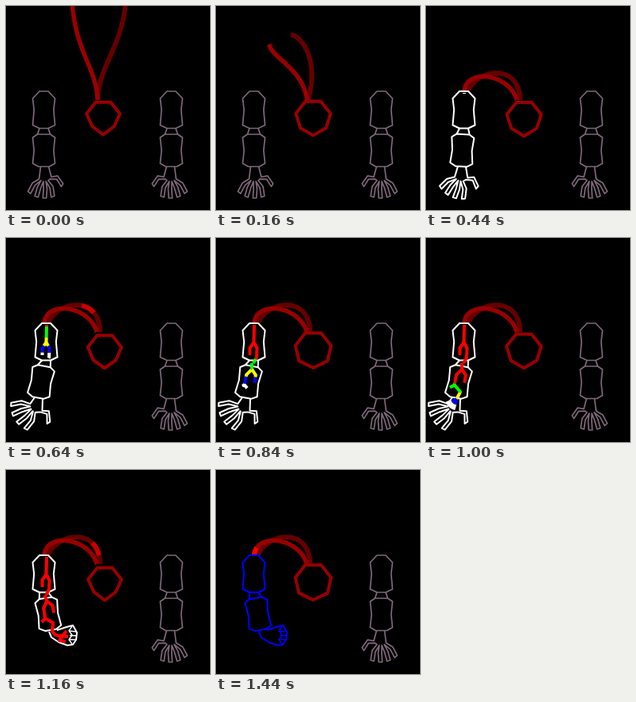
Recreate the animation shown at these times as an HTML page with a canvas. Size 256 by 256 pixels, loop 1.48 s.

```html
<!DOCTYPE html>
<html lang="en">
<head>
<meta charset="utf-8">
<title>Heart and arm</title>
<style>
html, body { margin: 0; width: 100%; height: 100%; overflow: hidden; background: #000; }
canvas { display: block; width: 100vw; height: 100vh; }
</style>
</head>
<body>
<canvas id="stage" width="256" height="256"></canvas>
<script>
const ctx = document.getElementById('stage').getContext('2d');
const LOOP = 1480, STEP = 40, BEAT = 580;
const SWING = 280, ATTACH = 440, FLASH = 1080, FLASH_END = 1160;
const AXIS = 47.5, ELBOW = 147, PALM = [48.5, 211];
const DIM = '#7e687a', RED = '#f00';
// Colours of the pulse, from its front backwards
const BANDS = [['#fff', 0, 7], ['#00f', 7, 16], ['#ff0', 16, 27], ['#0f0', 27, 41], [RED, 41, 900]];

const clamp = x => Math.max(0, Math.min(1, x));
const ramp = (t, a, b) => clamp((t - a) / (b - a));
const mix = (a, b, k) => a + (b - a) * k;
const rad = deg => deg * Math.PI / 180;
const blend = (p, q, k) => p.map(([x, y], i) => [mix(x, q[i][0], k), mix(y, q[i][1], k)]);
const shift = (p, dx) => p.map(([x, y]) => [x + dx, y]);

function turn(p, deg) {
  const c = Math.cos(rad(deg)), s = Math.sin(rad(deg));
  return p.map(([x, y]) => [
    AXIS + (x - AXIS) * c - (y - ELBOW) * s,
    ELBOW + (x - AXIS) * s + (y - ELBOW) * c
  ]);
}

function line(p, color, width, closed) {
  ctx.beginPath();
  p.forEach(([x, y]) => ctx.lineTo(x, y));
  if (closed) ctx.closePath();
  ctx.strokeStyle = color;
  ctx.lineWidth = width;
  ctx.stroke();
}

// Strokes only the stretch between two distances along the line
function part(p, color, width, from, to) {
  const a = Math.max(0, from);
  if (to <= a) return;
  ctx.setLineDash([to - a, 2000]);
  ctx.lineDashOffset = -a;
  line(p, color, width);
  ctx.setLineDash([]);
}

// Symmetric bone: narrow ends, wide shoulders, slight waist
function limb(top, bottom, neck, foot, slope) {
  const side = [[neck, top], [14, top + slope], [12.3, (top + bottom) / 2], [14, bottom - 4], [foot, bottom]];
  const left = side.map(([w, y]) => [AXIS - w, y]);
  const right = side.map(([w, y]) => [AXIS + w, y]);
  return [...right, ...left.reverse()];
}
const UPPER = limb(107, 153.5, 5.5, 5.5, 9);
const LOWER = limb(161, 201.5, 8, 7, 4);

// Polar place seen from the palm: angle from straight down, positive to the left
function fromPalm(deg, r, side = 0) {
  const s = Math.sin(rad(deg)), c = Math.cos(rad(deg));
  return [PALM[0] - s * r - c * side, PALM[1] + c * r - s * side];
}

// Four fingers and a thumb, from relaxed (0) to splayed (1)
function fingers(k) {
  const tilt = mix(10, 48, k), spread = mix(20, 22, k), reach = mix(30, 33, k);
  return [1.5, 0.5, -0.5, -1.5, 0].map((n, i) => {
    const off = i < 4 ? n * spread : -mix(68, 92, k);
    const r = i < 4 ? reach : 26;
    return { base: tilt + off, bent: tilt + off * 1.25, r };
  });
}

function hand(k) {
  const out = [[AXIS - 4, 201.5]];
  for (const { base, bent, r } of fingers(k)) {
    const edge = w => [fromPalm(base, 9, w * 0.7), fromPalm(bent, r * 0.62, w), fromPalm(base, r, w)];
    out.push(...edge(2.2), ...edge(-2.2).reverse());
  }
  out.push([AXIS + 6, 201.5]);
  return out;
}

const FIST = [[54, 203], [57, 210], [66, 216], [77, 220], [84, 219], [88, 213], [89, 204], [84, 195], [76, 197], [64, 201]];

function knuckles(color) {
  const fold = [0, 1, 2, 3, 4].map(i => [83 - 4 * (i % 2), 196 + 5.6 * i]);
  line(fold, color, 1.5);
  for (let i = 0; i < 3; i++) line([[80, 202 + 5.4 * i], [88.5, 203 + 5 * i]], color, 1.5);
}

// Each vein: distance from the shoulder, then its points
const VEINS_UP = [
  [0, [[48, 109], [47.5, 131], [51.5, 138], [51, 150], [47, 157]]],
  [22, [[47.5, 131], [42.5, 138], [42.5, 147]]]
];
const VEINS_LOW = [
  [49, [[47, 157], [48.5, 165], [43, 173], [43, 186], [52, 193], [49, 203]]],
  [58, [[48.5, 165], [54.5, 171], [55, 181]]],
  [82, [[43, 186], [38, 190]]]
];
const VEINS_OPEN = fingers(1).slice(0, 4).map(({ base, bent, r }) =>
  [105, [[49, 203], fromPalm(bent, 12), fromPalm(base, r - 4)]]);
const VEINS_FIST = [
  [105, [[57, 201], [62, 207], [70, 209], [76, 202]]],
  [119, [[70, 209], [67, 214], [75, 215]]],
  [114, [[67, 208], [78, 209]]]
];

function arm(color, width, angle, dx, palm) {
  const lower = shift(turn(LOWER, angle), dx), upper = shift(UPPER, dx);
  line(upper, color, width, true);
  line(lower, color, width, true);
  line([upper[4], lower[0]], color, width);
  line([upper[5], lower[9]], color, width);
  line(palm, color, width);
}

function flow(veins, place, reach, bands) {
  for (const [start, p] of veins) {
    for (const [tint, near, far] of bands) {
      part(place(p), tint, 4, reach - far - start, reach - near - start);
    }
  }
}

function liveArm(t) {
  const k = ramp(t, 400, 520), angle = 11 * k;
  const dx = (t / STEP) % 2 ? 0 : 3;
  const place = p => shift(turn(p, angle), dx);
  const reach = (t - 435) * 0.21;
  arm('#fff', 2, angle, dx, place(hand(k)));
  flow(VEINS_UP, p => shift(p, dx), reach, BANDS);
  flow(VEINS_LOW, place, reach, BANDS);
  flow(VEINS_OPEN, place, reach, BANDS);
}

// The clenched arm turns blue while the blood draws back
function clenchedArm(t) {
  const c = Math.round(255 * (1 - ramp(t, 1240, 1400)));
  const color = `rgb(${c},${c},255)`;
  const reach = mix(150, 0, ramp(t, 1200, 1420));
  const red = [[RED, 0, 900]];
  arm(color, 2, -9, 0, FIST);
  knuckles(color);
  flow(VEINS_UP, p => shift(p, 3), reach, red);
  flow(VEINS_LOW, p => turn(p, -9), reach, red);
  flow(VEINS_FIST, p => p, reach, red);
}

// Bezier handles of the cords: raised, swinging, attached
const FRONT = [
  [[83, -4], [88, 60], [113, 76], [115, 118]],
  [[55, 87], [54, 68], [105, 78], [114, 118]],
  [[48, 107], [50, 78], [104, 84], [114, 118]]
];
const BACK = [
  [[150, -4], [146, 50], [116, 76], [115, 118]],
  [[52, 66], [74, 26], [142, 56], [116, 118]],
  [[53, 106], [68, 76], [118, 74], [118, 118]]
];

function cord(poses, t) {
  const h = t < SWING ? blend(poses[0], poses[1], t / SWING)
    : blend(poses[1], poses[2], ramp(t, SWING, ATTACH));
  return Array.from({ length: 25 }, (_, i) => {
    const u = i / 24, v = 1 - u;
    const at = j => v * v * v * h[0][j] + 3 * v * v * u * h[1][j] + 3 * v * u * u * h[2][j] + u * u * u * h[3][j];
    return [at(0), at(1)];
  });
}

function cords(t) {
  const front = cord(FRONT, t), back = cord(BACK, t);
  line(back, '#660000', 6);
  line(front, '#990000', 5.5);
  const d = ((t - 500) % BEAT) * 0.25;
  if (t >= 500 && d < 80) part(back.reverse(), '#c80000', 6, d - 9, d + 9);
  part(front, RED, 6, 0, 10 * ramp(t, 1360, 1420));
}

// Heptagon whose lower flanks are drawn in at each beat
function heart(t) {
  const squeeze = 0.5 + 0.5 * Math.cos(2 * Math.PI * t / BEAT);
  const jolt = t >= ATTACH ? 2 * squeeze : 0;
  const shape = Array.from({ length: 7 }, (_, i) => {
    const a = Math.PI * (0.5 + 2 * i / 7), c = Math.cos(a), s = Math.sin(a);
    const r = 23 - squeeze * (1.5 + 8 * Math.max(0, s) * Math.abs(c));
    return [122 + jolt + r * c, 140 + jolt + r * s];
  });
  line(shape, '#990000', 4, true);
}

function draw(now) {
  const t = Math.floor((now % LOOP) / STEP) * STEP;
  const flash = t >= FLASH && t < FLASH_END;
  ctx.fillStyle = flash ? '#fff' : '#000';
  ctx.fillRect(0, 0, 256, 256);
  if (flash) return;
  ctx.lineJoin = 'round';
  cords(t);
  heart(t);
  ctx.save();
  ctx.translate(255, 0);
  ctx.scale(-1, 1);
  arm(DIM, 1.7, 0, 0, hand(0));
  ctx.restore();
  if (t < ATTACH) arm(DIM, 1.7, 0, 0, hand(0));
  else if (t < FLASH) liveArm(t);
  else clenchedArm(t);
}

const begin = performance.now();
function tick() {
  draw(performance.now() - begin);
  requestAnimationFrame(tick);
}
tick();
</script>
</body>
</html>
```
